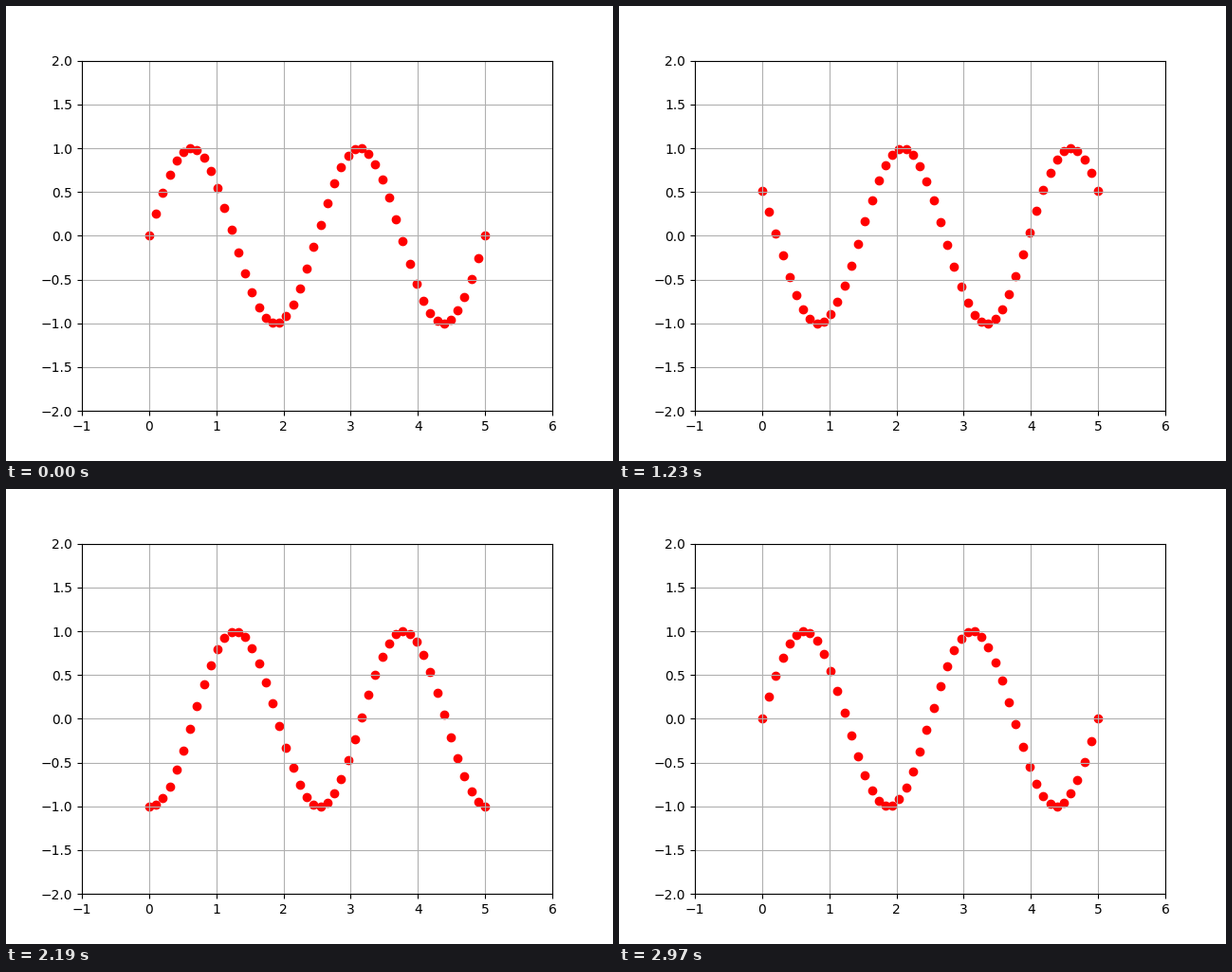
These frames come from a looping animation (640 px wide and 480 px high, 3000 ms). A matplotlib script:

```python
import numpy as np
import matplotlib.pyplot as plt
from matplotlib.animation import FuncAnimation

FRAMES = 100
INTERVAL = 30

x = np.linspace(0, 5, 50)
phases = np.linspace(0, 2 * np.pi, FRAMES)


def wave(phase):
    return np.sin(4 * np.pi / 5 * x + phase)


fig, ax = plt.subplots(figsize=(6.4, 4.8), dpi=100)
ax.set_xlim(-1, 6)
ax.set_ylim(-2, 2)
ax.grid(True)
dots = ax.scatter(x, wave(0), color="red")


def update(i):
    dots.set_offsets(np.column_stack((x, wave(phases[i]))))
    return (dots,)


anim = FuncAnimation(fig, update, frames=FRAMES, interval=INTERVAL,
                     repeat=True, repeat_delay=0, blit=False)
plt.show()
```
